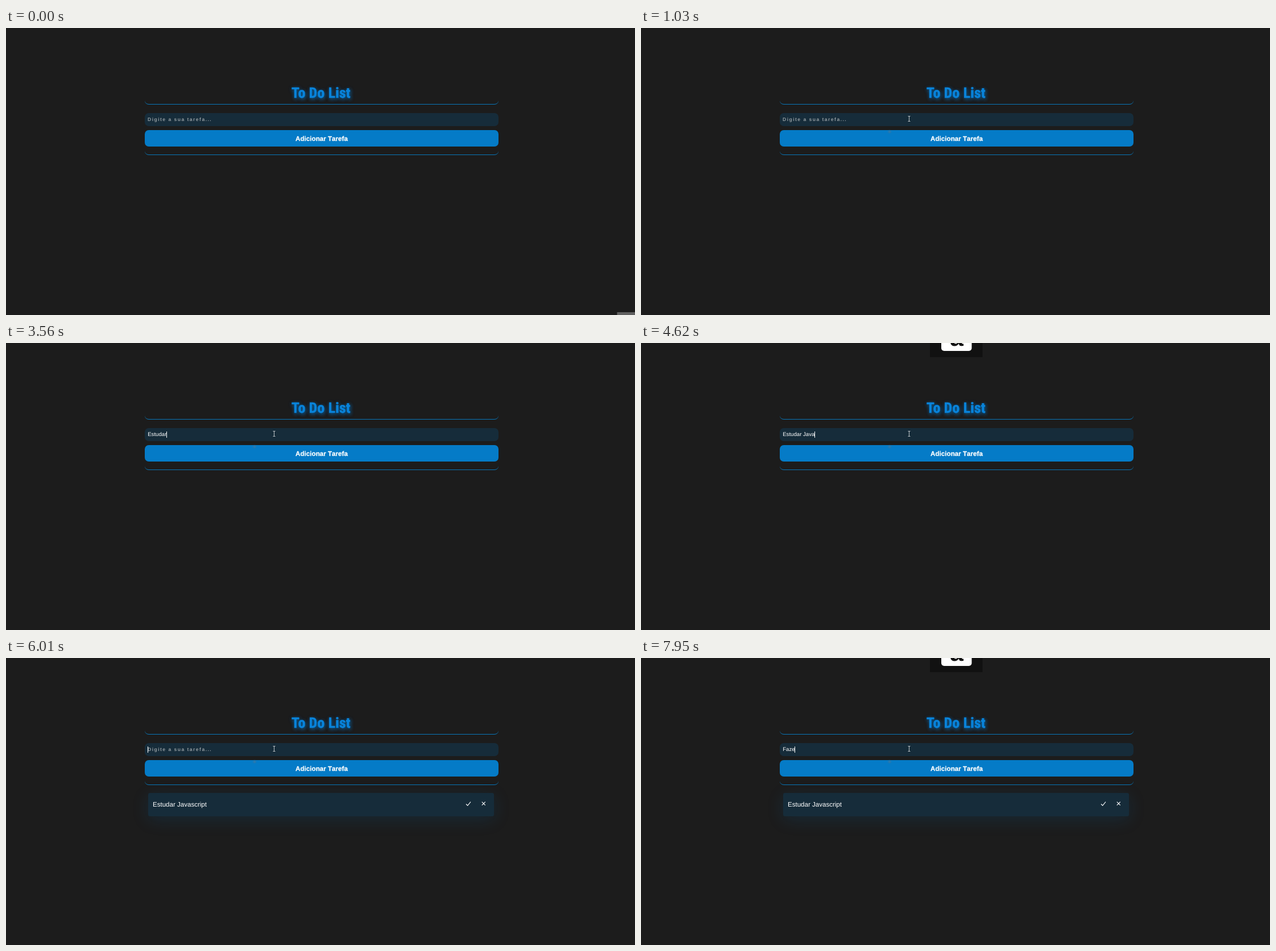
An HTML page for the animation above (8 s loop, 1106x506 px).

```html
<!DOCTYPE html>
<html lang="pt-BR">
<head>
<meta charset="utf-8">
<title>To Do List</title>
<style>
  html, body { margin: 0; width: 100%; height: 100%; overflow: hidden; background: #1c1c1c; }
  #stage { position: absolute; left: 0; top: 0; width: 1106px; height: 506px; overflow: hidden; }
  .rule { position: absolute; left: 244px; width: 622px; height: 20px; box-sizing: border-box;
    border-bottom: 1px solid #0876b8; border-radius: 7px; }
  #card { position: absolute; left: 250px; top: 238px; width: 608px; height: 41px;
    border-radius: 3px; background: #162c3a; box-shadow: 0 6px 30px rgba(5, 123, 199, .15); }
  svg { position: absolute; left: 0; top: 0; }
  text { font-family: "Liberation Sans", Arial, sans-serif; font-kerning: none;
    white-space: pre; text-rendering: geometricPrecision; fill: #fff; }
  #title { font: 900 25.5px "Roboto Condensed", Roboto, "Open Sans", sans-serif; font-stretch: 75%;
    letter-spacing: .3px; fill: #0a85dc; stroke: #0a85dc; stroke-width: .5px;
    text-shadow: 1px 2px 6px rgba(0, 125, 215, .75); }
  #label { font-size: 11.65px; font-weight: bold; stroke: #fff; stroke-width: .25px; }
  #hint { font-size: 8.64px; font-weight: bold; letter-spacing: 1.44px; fill: #919a9f; }
  #typed { font-size: 9.63px; }
  #task { font-size: 11.55px; }
  #keyLetter { font-size: 43px; font-weight: bold; fill: #111; }
</style>
</head>
<body>
<div id="stage">
  <div class="rule" style="top:115px"></div>
  <div class="rule" style="top:204px"></div>
  <div id="card"></div>
  <svg width="1106" height="506" viewBox="0 0 1106 506">
    <defs>
      <radialGradient id="smudgeFill">
        <stop offset="0" stop-color="#4a7899" stop-opacity=".75"/>
        <stop offset="1" stop-color="#2c74a5" stop-opacity="0"/>
      </radialGradient>
    </defs>

    <text id="title" x="554" y="123" text-anchor="middle">To Do List</text>

    <rect x="244" y="150" width="622" height="23" rx="7" fill="#162c3a"/>
    <text id="hint" x="249" y="164">Digite a sua tarefa...</text>
    <text id="typed" x="249.2" y="164"></text>
    <rect id="caret" y="156" width="1" height="11" fill="#fff"/>

    <g id="button">
      <rect x="244" y="180" width="622" height="29" rx="7" fill="#057bc7"/>
      <text id="label" x="555" y="198.5" text-anchor="middle">Adicionar Tarefa</text>
    </g>
    <ellipse id="smudge" cx="437" cy="183" rx="4.5" ry="4" fill="url(#smudgeFill)"/>

    <g id="taskRow" fill="none" stroke="#fff" stroke-width="1.1">
      <text id="task" x="258" y="262" stroke="none">Estudar Javascript</text>
      <path d="M809 257.5l2.7 2.7 5.3-6.5M836.8 253.6l6 6m0-6l-6 6"/>
    </g>

    <g id="capsKey">
      <rect x="508" y="-67" width="92.5" height="92" fill="#111"/>
      <rect x="528" y="-40" width="53.5" height="54" rx="5" fill="#fff"/>
      <text id="keyLetter" x="555" text-anchor="middle"></text>
    </g>

    <rect id="corner" x="1074.5" y="501" width="32" height="5" fill="#606060"/>
    <path id="arrow" d="M0 0V8.6L2 6.8 3.5 10l1.2-.6-1.4-3.1H6.1z" fill="#fff" stroke="#000" stroke-width=".5"/>
    <path id="beam" d="M-2 -4.5H2M0 -4.5V4.5M-2 4.5H2" fill="none" stroke="#bcc2c6"/>
  </svg>
</div>
<script>
  const LOOP = 8000, BLINK = 530, FOCUS = 1160, ADDED = 6010;
  const el = id => document.getElementById(id);
  const show = (id, on) => { el(id).style.display = on ? "" : "none"; };
  const move = (id, x, y) => el(id).setAttribute("transform", `translate(${x} ${y})`);

  const words = [
    { text: "Estudar Javascript", until: ADDED,
      keys: [2090, 2290, 2550, 3030, 3370, 3490, 3560, 3820, 4150,
             4420, 4550, 4620, 4820, 5020, 5220, 5550, 5680, 5810] },
    { text: "Faze", until: LOOP, keys: [7420, 7620, 7820, 7950] }
  ];
  // Caps lock indicator: switched on, switched off, hidden
  const capsTimes = [[1960, 2160, 3230], [4020, 4220, 5290], [7290, 7490, LOOP]];

  function drawInput(t) {
    const word = words.find(w => t < w.until);
    const text = word.text.slice(0, word.keys.filter(k => k <= t).length);
    el("typed").textContent = text;
    show("hint", !text);

    const pressed = [FOCUS, ...words.flatMap(w => w.keys)].filter(k => k <= t);
    const idle = t - pressed[pressed.length - 1];
    show("caret", pressed.length && Math.floor(idle / BLINK) % 2 === 0);
    const width = text ? el("typed").getComputedTextLength() : 0;
    el("caret").setAttribute("x", Math.floor(249.4 + width));
  }

  function drawCaps(t) {
    const caps = capsTimes.find(c => t >= c[0] && t < c[2]);
    show("capsKey", caps);
    if (!caps) return;
    const upper = t < caps[1];
    el("keyLetter").textContent = upper ? "A" : "a";
    el("keyLetter").setAttribute("y", upper ? 7 : 4.5);
  }

  function drawPointer(t) {
    const p = Math.min(11, Math.floor((t - 70) / 69)) / 11;
    const ease = 1 - (1 - p) ** 2;
    const x = 1080 - 647 * ease, y = 495 - 318 * ease;
    const travelling = t >= 70 && t < 890;
    show("arrow", travelling);
    move("arrow", x, y);

    const hover = travelling && y > 180 && y < 209;
    el("button").setAttribute("transform",
      hover ? "translate(555 194.5) scale(1.01) translate(-555 -194.5)" : "");

    show("beam", t >= 890);
    const rest = Math.min(1, Math.max(0, Math.floor((t - 890) / 70) / 2));
    move("beam", 455.5 + 16 * rest, 165 - 5 * rest);
    show("smudge", t >= 890);
  }

  function frame() {
    const t = performance.now() % LOOP;
    show("corner", t < 70);
    show("card", t >= ADDED);
    show("taskRow", t >= ADDED);
    drawInput(t);
    drawCaps(t);
    drawPointer(t);
    requestAnimationFrame(frame);
  }
  frame();
</script>
</body>
</html>
```
